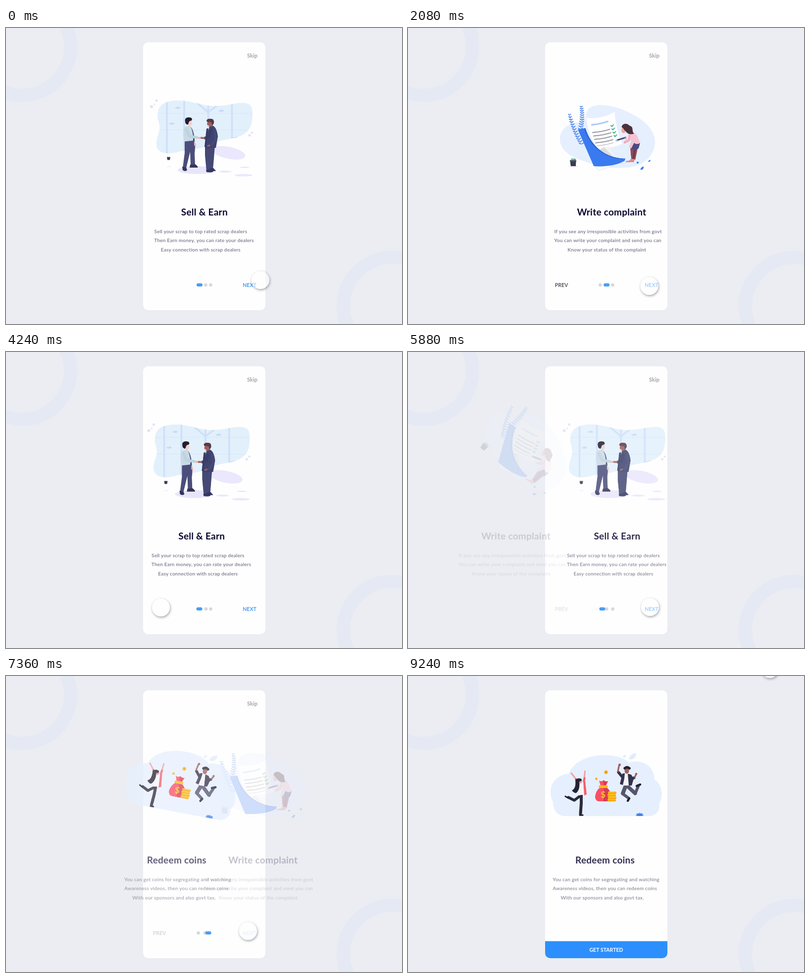
Recreate the animation shown at these times as an HTML page with a canvas. Size 800 px wide and 600 px high, loop 9.28 s.

```html
<!DOCTYPE html>
<html lang="en">
<head>
<meta charset="utf-8">
<title>Onboarding</title>
<style>
html, body { margin: 0; width: 100%; height: 100%; overflow: hidden; background: #ebedf2; }
canvas { display: block; width: 800px; height: 600px; }
</style>
</head>
<body>
<canvas id="stage" width="800" height="600"></canvas>
<script>
const LOOP = 9280, STEP = 40, SWIPE = 800;
const stage = document.getElementById('stage').getContext('2d');
let g = stage;

// ---- drawing helpers (all draw on g) ----
function fill(color, d) {
  g.fillStyle = color;
  g.fill(new Path2D(d));
}
function line(color, width, d) {
  g.strokeStyle = color;
  g.lineWidth = width;
  g.lineCap = g.lineJoin = 'round';
  g.stroke(new Path2D(d));
}
function oval(color, x, y, rx, ry = rx, turn = 0) {
  g.fillStyle = color;
  g.beginPath();
  g.ellipse(x, y, rx, ry, turn, 0, 7);
  g.fill();
}
function box(color, x, y, w, h, r) {
  g.fillStyle = color;
  g.beginPath();
  g.roundRect(x, y, w, h, r);
  g.fill();
}
function text(str, x, y, size, weight, color, alpha = 1, spacing = 0) {
  if (alpha <= 0) return;
  g.globalAlpha = alpha;
  g.font = `${weight} ${size}px Lato, sans-serif`;
  g.letterSpacing = spacing + 'px';
  g.textAlign = 'center';
  g.fillStyle = color;
  g.fillText(str, x + spacing / 2, y);
  g.globalAlpha = 1;
}

// ---- illustrations ----
function handshake() {
  const blob = 'M307 172C308 155 322 148 345 147C372 146 392 157 418 158C446 159 462 151 480 152C496 153 498 160 498 176C498 200 490 213 470 220C450 227 435 226 418 234C395 246 372 247 352 250C330 257 306 256 304 238C302 222 312 212 310 198C309 188 304 184 307 172Z';
  fill('#e2f0fc', blob);
  g.save();
  g.clip(new Path2D(blob));
  line('#d6e4f9', 1, 'M300 173H500M300 207H500');
  line('#cfdff8', 3.5, 'M325 140V260M360 140V260M408.500 172V260M456.500 140V260');
  line('#cfdff8', 3.5, 'M384 150L408.500 171L433 152M408.500 150V172');
  g.restore();
  for (const [x, y] of [[347, 162], [335, 194], [435, 168]]) {
    oval('#c9d9f6', x, y, 5.5, 1.8);
    oval('#c9d9f6', x + 1, y - 1, 3, 1.5);
  }
  line('#b9c8ea', .8, 'M456 223q3-2 5 0q3-2 7-2');
  oval('#e4e1f7', 304, 147, 2.6);
  oval('#e4e1f7', 300, 155, 1.5);
  oval('#e4e1f7', 294, 159.500, 3.2);
  oval('#e4e1f7', 497, 212, 2);
  oval('#e4e1f7', 492, 217.500, 2.5);
  oval('#ebe7fd', 450, 253, 34, 12, .2);
  oval('#e8e5fb', 386, 288, 39, 8);
  oval('#ebe7fd', 443, 291, 13, 2);
  oval('#ebe7fd', 480, 298.500, 18, 2.5);
  oval('#ebe7fd', 482, 282.500, 10, 1.5);
  oval('#efecfb', 329, 281, 4.5, 1);
  fill('#3b3a52', 'M325 261.500H332L331 267.500H326Z');

  // left man
  fill('#4b4e7b', 'M361 228L381 228Q383 240 381 254L382 279H373L372 251L364 284H357L361 253Z');
  fill('#35365a', 'M356 281L364 283L366 288Q362 292 357 288ZM372 277L382 276Q389 281 387 283H371Z');
  fill('#f3b6b4', 'M380 229l4 7l-1 6l-3-5Z');
  fill('#f7cfc9', 'M368 187h7l1 8l-3 3v4l-5-2Z');
  fill('#c8dae5', 'M361 200L371 198Q379 206 380 228L361 230Q355 212 361 200Z');
  fill('#3c4068', 'M373 200Q380 208 381 229L378 229Q379 212 373 200Z');
  line('#bed2de', 5.5, 'M364 206L370 219L386 222');
  line('#f0aba8', 3.5, 'M390 223L395 222');
  fill('#211d30', 'M362 190C360 181 368 180 374 182C377 184 376 188 373 188C368 189 370 194 367 196Q362 195 362 190Z');

  // right man
  fill('#454974', 'M402 238L422 238L420 264L418 288H412L412 256L413 290H405L402 258Z');
  fill('#343760', 'M404 288L412 286L419 290Q418 294 405 292ZM413 284L419 284L424 290H413Z');
  fill('#f2f3fa', 'M405 203L413 199L409 222L404 222Z');
  fill('#9d5f5a', 'M407 189H417V201L410 202V198L406 196Z');
  fill('#3f4370', 'M411 201L418 198Q426 202 428 220L424 243L402 244L405 217Z');
  fill('#363a63', 'M405 204L409 203L404 241H401Z');
  line('#393d68', 5.5, 'M413 208L410 221L402 223');
  line('#9d5f5a', 3.5, 'M395 223L400 223M408 239L411 238');
  line('#454974', 5.5, 'M422 208L424 226L415 237');
  fill('#57394a', 'M405 188Q406 183 414 184Q421 184 420 193L417 198L415 191L406 190Z');
}

// Leaf pairs along a curve, growing away from the tip.
function frond(x0, y0, cx, cy, x1, y1, n) {
  line('#4a83ea', .8, `M${x0} ${y0}Q${cx} ${cy} ${x1} ${y1}`);
  for (let i = 0; i <= n; i++) {
    const k = i / n, m = 1 - k;
    const x = m * m * x0 + 2 * m * k * cx + k * k * x1;
    const y = m * m * y0 + 2 * m * k * cy + k * k * y1;
    const len = 1.6 + 1.3 * Math.sqrt(k);
    oval('#4a83ea', x - len, y - 1, len, 1, .65);
    oval('#4a83ea', x + len, y - 1, len, 1, -.65);
  }
}

function complaint() {
  fill('#e6effe', 'M358 172C362 152 395 152 425 163C470 180 497 205 496 232C495 262 470 282 435 283C400 285 375 278 350 268C320 258 303 243 304 222C306 198 330 190 345 190C356 189 356 182 358 172Z');
  frond(348, 159, 352, 180, 346, 204, 10);
  frond(324, 175, 331, 205, 347, 234, 12);
  fill('#fff', 'M372 275L382 288L408 280Z');
  line('#d9dde6', .7, 'M375 280L382 288L408 280');
  fill('#fff', 'M358 181C375 184 398 180 415 170C417 195 422 215 430 234C420 240 408 242 398 242L414 263C385 260 362 225 358 181Z');
  fill('#d9dbe1', 'M393 241L378 249Q392 262 414 263Z');
  fill('#f2f2f5', 'M393 241L405 240L414 263Z');
  line('#afcbf5', 3.2, 'M369 195.500Q386 194 401 189');
  for (let i = 0; i < 4; i++)
    line('#9d9ca4', 2, `M${370 + i * 2} ${211 + i * 7}q19-1 35-6`);
  line('#c3c2ca', 1.5, 'M379 238q18-1 33-6');
  for (let i = 0; i < 4; i++) {
    const x = 408 + i * 2.1, y = 198 + i * 6.8;
    oval('#cdebe2', x + 2, y, 3.2, 2.4);
    line('#36a884', 1.4, `M${x - 1} ${y - 1}l2 2.500l4-4`);
  }
  fill('#3a7af0', 'M340.500 204.500L356 202C365 235 393 264 436 264.500L434.500 269C420 278 396 281 372 279.500Z');
  fill('#2e66d2', 'M356 202C365 235 393 264 436 264.500C398 268 363 240 353 202.500Z');

  // woman
  fill('#8d4a58', 'M446 244H461L456 267L448 269Z');
  fill('#713847', 'M453 247L457 246L453 268H450Z');
  fill('#d98c91', 'M448 265L455 266L453 272H436Q436 269 443 269Z');
  fill('#4c4b82', 'M450 231L466 233L463 244Q456 250 447 244Z');
  fill('#f4c4d2', 'M441 213Q453 208 460 218L466 233Q460 238 454 233L448 244L443 242L448 230Z');
  line('#eeb3c4', 5, 'M445 218L443 228L436 231');
  line('#4a4a80', 3, 'M420 227L437 222');
  oval('#aacaf5', 418.500, 228, 2.2);
  oval('#efa8a5', 437, 224, 2.2);
  oval('#efa8a5', 435, 232, 2.2);
  oval('#e9a9a6', 433, 207, 4.5, 6);
  fill('#4b313c', 'M429 201C430 193 440 192 445 198C455 201 448 208 454 214C449 217 440 215 437 209C434 208 433 202 429 201Z');

  // pot and leaves
  line('#e6e7ed', 1, 'M320 279H340');
  line('#42b68d', 2.5, 'M330 268L328 264M331 268L335 265M330 268L326 267M331 268L332 264');
  fill('#3b3a50', 'M324 267H336.500L335.500 279H325.500Z');
  fill('#515069', 'M324 267H336.500V269.500H324Z');
  fill('#3d7ff0', 'M466 287q1-5 7-6q0 6-5 7ZM458 273q2-3 5-1q0 3-3 3ZM482 271q1-3 5-3q-1 4-4 4Z');
}

function coins() {
  fill('#e6effe', 'M318 284C300 284 293 270 293 255C283 238 286 202 325 198C342 152 428 153 446 176C470 167 498 181 498 210C514 219 517 246 507 259C511 272 501 284 486 284Z');
  fill('#e2ecfd', 'M446 169q2-11 15-13q0 14-13 13ZM434 164q1-4 7-5q-1 6-5 7Z');

  // woman
  line('#f2a0a3', 3, 'M341 211L330 197M356 208L357.500 193');
  line('#f0616c', 4, 'M355 216L356.500 207M344 215L339 209');
  line('#2b2a3a', 5.5, 'M349 242L336 252L324 246');
  line('#2b2a3a', 6, 'M350 242L350 258L348.500 279');
  line('#1f1d2b', 3, 'M323 247L318 244M347 282H353');
  fill('#f5f3f7', 'M343 216L355 214L358 240L345 242Z');
  fill('#f0616c', 'M354 214L358 213L361 240L356 242Z');
  oval('#f2a0a3', 348, 213, 4, 5);
  fill('#242231', 'M338 211Q343 205 351 209L350 213L346 214Q348 230 340 237Q336 238 331 232Q340 228 338 211Z');

  // money bag
  fill('#f94f64', 'M386 212Q391 215 395 211Q399 215 404 213L400 222H389Z');
  fill('#f94f64', 'M388 226H401Q412 234 410 249Q408 254 402 254H386Q379 254 378 245Q379 233 388 226Z');
  fill('#d93b52', 'M395 211Q399 215 404 213L400 222H395ZM395 226H401Q412 234 410 249Q408 254 402 254H395Z');
  box('#fcb61a', 385.500, 221.500, 18, 5.500, 2.500);
  text('$', 394, 246.500, 17, 700, '#ffc52e');
  for (let i = 0; i < 4; i++) {
    const x = 403 + (i % 2) * .8, y = 249 - i * 5;
    box('#f7a80d', x, y, 17, 5.300, 2);
    box('#ffc62f', x + 1, y, 15, 2.200, 1);
  }
  oval('#f9b419', 400, 195, 3.8);
  oval('#e99a0e', 400, 195, 1.5, 2.200);
  oval('#f9b419', 380.500, 208.500, 2.500);

  // man
  line('#57546f', 8, 'M440 222L434 238');
  line('#57546f', 6, 'M434 239L445 247');
  line('#57546f', 7.500, 'M444 224L459 238');
  line('#57546f', 6, 'M459 238L465 224');
  line('#232130', 4.500, 'M447 248L444 253M462 223L469 220');
  line('#35324a', 5.500, 'M434 206L425 195M452 209L457 206');
  line('#a0605a', 3.200, 'M424 193L426.500 181M458 205L461 199');
  oval('#a0605a', 427.500, 180, 2.500);
  oval('#a0605a', 461, 198.500, 2.300);
  fill('#f4f3f8', 'M435 198H447L447 222H435Z');
  fill('#35324a', 'M433 198L438 197L437 208L434 221L428 219ZM444 198L451 200L456 208L452 222H446Z');
  oval('#a0605a', 442, 192, 4.500, 6);
  for (let i = 0; i < 5; i++)
    oval('#272433', 438 + i * 2.300, 187 - Math.sin(i * .8) * 2, 2.700);

  // plant
  oval('#3a78ea', 468, 282.500, 8, 1.300);
  for (let i = -2; i <= 2; i++)
    oval('#3a78ea', 468 + i * 2.200, 279.800 + Math.abs(i) * .4, 1, 2.700, i * .5);
}

// Each picture is painted once so it can fade and turn as one piece.
function picture(draw) {
  const c = document.createElement('canvas');
  c.width = 1600;
  c.height = 1200;
  g = c.getContext('2d');
  g.scale(2, 2);
  draw();
  g = stage;
  return c;
}

const screens = [
  { art: picture(handshake), ink: 1, title: ['Sell & Earn', 400.7], body: [
    ['Sell your scrap to top rated scrap dealers', 393.3],
    ['Then Earn money, you can rate your dealers', 400],
    ['Easy connection with scrap dealers', 393.3]] },
  { art: picture(complaint), ink: 1, title: ['Write complaint', 408], body: [
    ['If you see any irresponsible activities from govt', 400.8],
    ['You can write your complaint and send you can', 400.3],
    ['Know your status of the complaint', 398.4]] },
  { art: picture(coins), ink: .84, title: ['Redeem coins', 398], body: [
    ['You can get coins for segregating and watching', 400],
    ['Awareness videos, then you can redeem coins', 397.5],
    ['With our sponsors and also govt tax.', 392.5]] }
];

// ---- timing ----
const clamp = v => Math.max(0, Math.min(1, v));

// cubic-bezier(.45, 1.38, .75, 1): overshoots slightly, then settles
function backOut(x) {
  if (x <= 0) return 0;
  if (x >= 1) return 1;
  const bez = (s, a, b) => 3 * s * (1 - s) ** 2 * a + 3 * s * s * (1 - s) * b + s ** 3;
  let lo = 0, hi = 1;
  for (let i = 0; i < 24; i++) {
    const mid = (lo + hi) / 2;
    if (bez(mid, .45, .75) < x) lo = mid; else hi = mid;
  }
  return bez(lo, 1.38, 1);
}
const inOut = k => k < .5 ? 4 * k ** 3 : 1 - 4 * (1 - k) ** 3;

const swipes = [
  { at: 1360, low: 0, back: false },
  { at: 3600, low: 0, back: true },
  { at: 5840, low: 0, back: false },
  { at: 7100, low: 1, back: false }
];

// start, end, from x/y, to x/y, sideways bulge x/y
const moves = [
  [0, 800, 514, 511, 487.5, 523, 0, 0],
  [2340, 3280, 487.5, 523, 313, 518, 0, 0],
  [4520, 5500, 313, 518, 489, 517, 0, 8],
  [7900, 9240, 489, 517, 731, -14, 105, 0]
];

// ---- scene parts ----
function ring(x, y) {
  g.strokeStyle = '#e5e9f4';
  g.lineWidth = 27;
  g.beginPath();
  g.arc(x, y, 98.5, 0, 7);
  g.stroke();
}

function drawScreen(s, alpha, shift, artX, artY, turn) {
  alpha = clamp(alpha);
  if (!alpha) return;
  g.save();
  g.globalAlpha = alpha;
  g.translate(400 + artX, 222 + artY);
  g.rotate(turn);
  g.drawImage(s.art, -400, -222, 800, 600);
  g.restore();
  text(s.title[0], s.title[1] + shift, 380, 19, 700, '#09062f', alpha * s.ink, .25);
  s.body.forEach(([str, x], i) =>
    text(str, x + shift, 416 + i * 18.4, 10, 600, '#78758a', alpha * s.ink, .2));
}

function drawCursor(t) {
  let m = moves[0];
  for (const n of moves) if (t >= n[0]) m = n;
  const [start, end, x0, y0, x1, y1, bx, by] = m;
  const k = inOut(clamp((t - start) / (end - start)));
  const bulge = Math.sin(Math.PI * k);
  const x = x0 + (x1 - x0) * k + bx * bulge;
  const y = y0 + (y1 - y0) * k + by * bulge;
  g.save();
  g.beginPath();
  g.rect(0, 0, 800, 600);
  g.arc(x, y, 18, 0, 7);
  g.clip('evenodd');
  g.shadowColor = 'rgba(30,32,50,.42)';
  g.shadowBlur = 5;
  g.shadowOffsetX = 1;
  g.shadowOffsetY = 2;
  oval('#fff', x, y, 18);
  g.restore();
  oval('rgba(255,255,255,.52)', x, y, 18);
}

function drawDots(low, f) {
  const dot = 'rgba(148,151,164,.36)';
  box('#489df6', 385 + 10 * (low + f), 517.5, 12, 6.6, 3.3);
  oval(dot, low ? 388.5 : 413.5, 520.8, 3.4);
  oval(dot, (low ? 413.5 : 403.5) - 15 * f, 520.8, 3.4);
}

function draw(t) {
  let s = swipes[0];
  for (const n of swipes) if (t >= n.at) s = n;
  const p = backOut((t - s.at) / SWIPE);
  const f = s.back ? 1 - p : p, e = 1 - f;
  const done = clamp(backOut((t - 8400) / SWIPE));

  g.fillStyle = '#ebedf2';
  g.fillRect(0, 0, 800, 600);
  ring(32, 38);
  ring(780, 563.5);
  box('#fefefe', 277, 29, 247, 543, 10);

  drawScreen(screens[s.low], e, 146 * f, 146 * f, 0, 0);
  drawScreen(screens[s.low + 1], f, -223 * e, -188 * e, -31 * e, e * Math.PI / 4);

  text('Skip', 497.5, 60, 11, 700, '#a3a2a9', 1 - done);
  text('PREV', 310, 525, 10.5, 700, '#57565d', clamp(s.low ? e : f));
  text('NEXT', 492, 525, 10.5, 700, '#479cf4', s.low ? clamp(e) : 1);

  g.globalAlpha = 1 - done;
  drawDots(s.low, f);
  g.globalAlpha = 1;

  if (done) {
    const top = 572 - 34.5 * done;
    g.save();
    g.beginPath();
    g.roundRect(277, 29, 247, 543, 10);
    g.clip();
    g.fillStyle = '#2c8ffd';
    g.fillRect(277, top, 247, 35);
    text('GET STARTED', 400.5, top + 21, 10.5, 700, '#fff');
    g.restore();
  }
  drawCursor(t);
}

const begin = performance.now();
function tick() {
  const t = (performance.now() - begin) % LOOP;
  draw(Math.floor(t / STEP) * STEP);
  requestAnimationFrame(tick);
}
tick();
</script>
</body>
</html>
```
